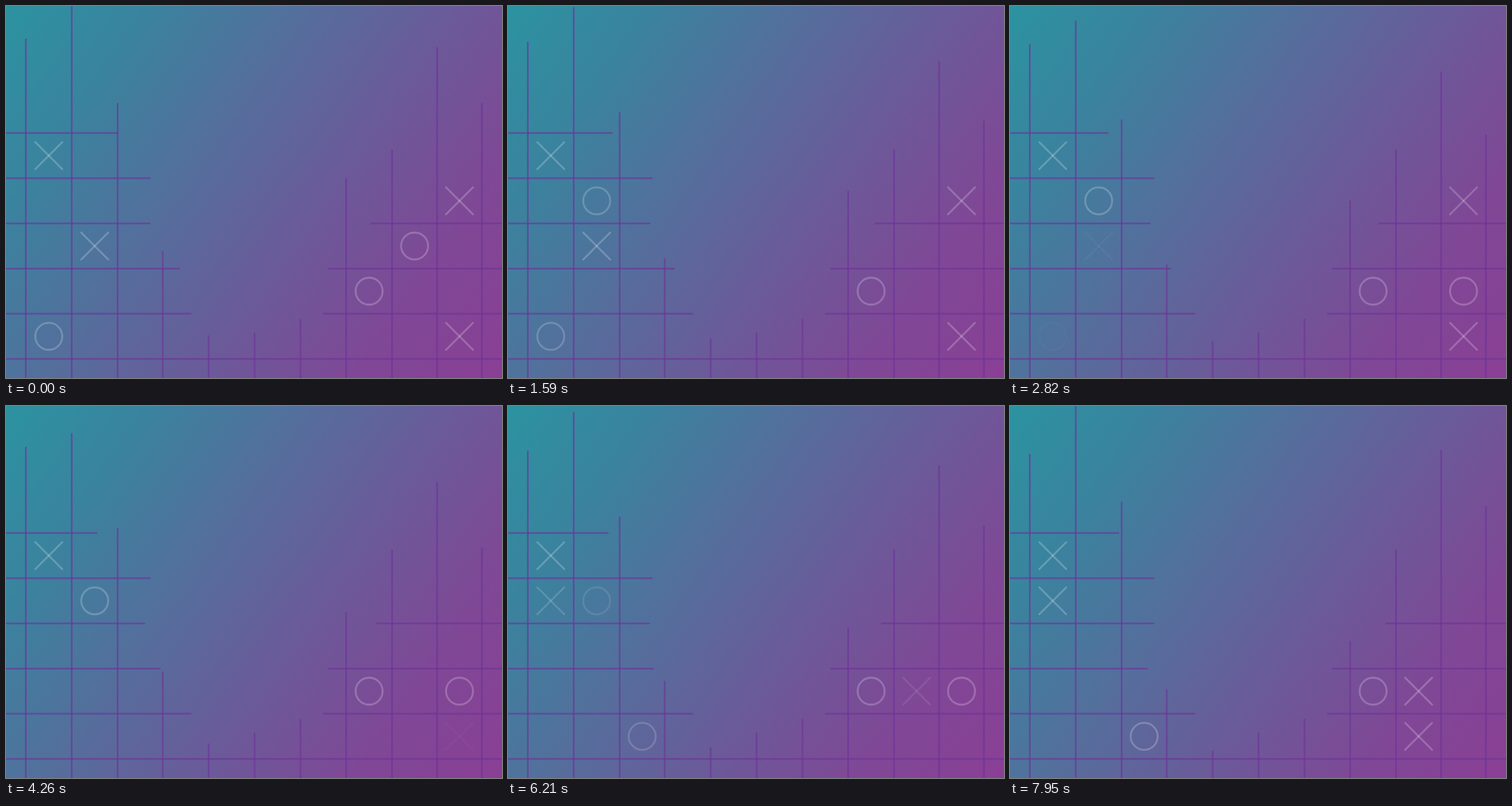
An HTML page with a canvas for the animation above (8 s loop, 864 by 648 pixels).

```html
<!DOCTYPE html>
<html lang="en">
<head>
<meta charset="utf-8">
<title>Noughts and crosses grid</title>
<style>
html, body { margin: 0; width: 100%; height: 100%; overflow: hidden; background: #675e9a; }
canvas { display: block; width: 100vw; height: 100vh; }
</style>
</head>
<body>
<canvas id="stage" width="864" height="648"></canvas>
<script>
const W = 864, H = 648, LOOP = 8;
const FADE_IN = 1.2, FADE_OUT = 1.5, RADIUS = 23.5;
const ctx = document.getElementById('stage').getContext('2d');

const backdrop = ctx.createLinearGradient(0, 0, 884, 619);
['#2b93a0', '#3b829e', '#556e9c', '#6b5a99', '#7f4896', '#8a3f95']
  .forEach((color, i, all) => backdrop.addColorStop(i / (all.length - 1), color));

const clamp = v => Math.min(1, Math.max(0, v));
const rowY = i => 221.3 + 78.7 * i;

// Moves at a steady speed, then comes back after the turn.
const drift = (start, speed = 0, turn = LOOP, back = speed) => t =>
  start + speed * Math.min(t, turn) - back * Math.max(0, t - turn);

const columns = [
  { x: 34.5, top: drift(57, 3.33) },
  { x: 114.5, top: drift(-28, 19, 4.11) },
  { x: 194.5, top: drift(169, 10.15, 4.65, 15) },
  { x: 273, top: drift(427, 8.37) },
  { x: 353, top: drift(574, 3.33) },
  { x: 433, top: drift(569) },
  { x: 513, top: drift(545) },
  { x: 592.5, top: drift(300, 13.8) },
  { x: 672.5, top: drift(250) },
  { x: 751, top: drift(72, 15.2, 4.13) },
  { x: 829, top: drift(169, 19.6, 4.11) }
];
const rows = [
  { left: drift(195.5, -8.6, 4.3) },
  { left: drift(251.5) },
  { left: drift(251.5, -2.5, 4), right: drift(635, 2.39) },
  { left: drift(302.5, -7.86), right: drift(561.5) },
  { left: drift(322.5), right: drift(552.5) },
  { left: drift(W + 4) }
];

// A mark sits in a cell and fades in and out, where times are given.
const mark = (shape, col, row, { enter = -LOOP, leave = LOOP } = {}) => ({
  shape,
  x: (columns[col].x + columns[col + 1].x) / 2,
  y: rowY(row + .5),
  strength: t => clamp((t - enter) / FADE_IN) * clamp(1 - (t - leave) / FADE_OUT)
});
const marks = [
  mark(cross, 0, 0),
  mark(ring, 7, 3),
  mark(ring, 8, 2, { leave: 0 }),
  mark(ring, 1, 1, { enter: .5, leave: 5.45 }),
  mark(ring, 0, 4, { leave: 1.45 }),
  mark(cross, 1, 2, { leave: 1.6 }),
  mark(ring, 9, 3, { enter: 1.6, leave: 6.45 }),
  mark(cross, 9, 1, { leave: 2.75 }),
  mark(cross, 9, 4, { leave: 2.95 }),
  mark(ring, 2, 4, { enter: 5.3 }),
  mark(cross, 0, 1, { enter: 5.35 }),
  mark(cross, 8, 3, { enter: 5.75 }),
  mark(cross, 8, 4, { enter: 6.25 })
];

function line(x1, y1, x2, y2) {
  ctx.beginPath();
  ctx.moveTo(x1, y1);
  ctx.lineTo(x2, y2);
  ctx.stroke();
}

function cross(x, y) {
  line(x - RADIUS, y - RADIUS, x + RADIUS, y + RADIUS);
  line(x + RADIUS, y - RADIUS, x - RADIUS, y + RADIUS);
}

function ring(x, y) {
  ctx.beginPath();
  ctx.arc(x, y, RADIUS, 0, Math.PI * 2);
  ctx.stroke();
}

function draw(t) {
  ctx.globalAlpha = 1;
  ctx.fillStyle = backdrop;
  ctx.fillRect(0, 0, W, H);

  ctx.lineWidth = 3;
  ctx.lineCap = 'round';
  ctx.strokeStyle = '#6d3399';
  ctx.globalAlpha = .62;
  for (const { x, top } of columns) line(x, top(t) + 1, x, H + 4);
  rows.forEach(({ left, right }, i) => {
    line(-4, rowY(i), left(t) - 1, rowY(i));
    if (right) line(right(t) + 1, rowY(i), W + 4, rowY(i));
  });

  ctx.lineWidth = 3.3;
  ctx.strokeStyle = '#fff';
  for (const { shape, x, y, strength } of marks) {
    ctx.globalAlpha = .21 * strength(t);
    shape(x, y);
  }
}

const begin = performance.now();
function frame() {
  draw((performance.now() - begin) / 1000 % LOOP);
  requestAnimationFrame(frame);
}
frame();
</script>
</body>
</html>
```
